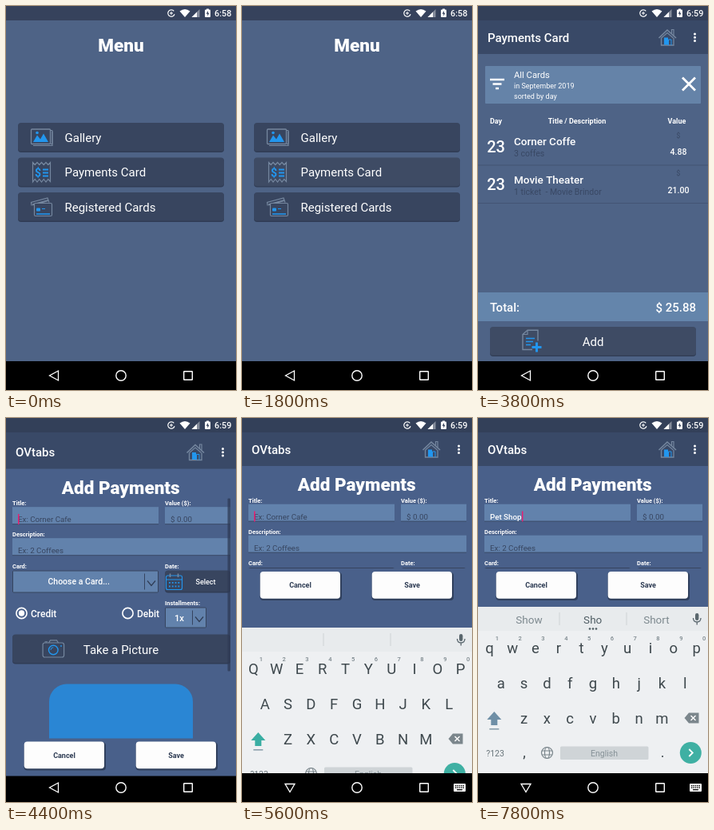
Recreate the animation shown at these times as an HTML page with a canvas. Size 288 by 480 pixels, loop 8000 ms.

```html
<!DOCTYPE html>
<html lang="en">
<head>
<meta charset="utf-8">
<title>Payments app</title>
<style>
html, body { margin: 0; width: 100%; height: 100%; overflow: hidden; background: #000; }
canvas { display: block; width: 288px; height: 480px; }
</style>
</head>
<body>
<canvas id="stage"></canvas>
<script>
const W = 288, H = 480, LOOP = 8000, STEP = 200;
const canvas = document.getElementById('stage');
const ctx = canvas.getContext('2d');
const dpr = window.devicePixelRatio || 1;
canvas.width = W * dpr;
canvas.height = H * dpr;

const BLUE = '#2296ee', STEEL = '#75879f', DARK = '#38455f', FIELD = '#6282ac',
      HINT = '#37455f', WHITE = '#fff', KEY = '#3e484d', SOFT = '#7b868c';

const clamp = v => Math.max(0, Math.min(1, v));
const easeOut = (p, k) => 1 - Math.pow(1 - clamp(p), k);

function rect(x, y, w, h, fill) {
  ctx.fillStyle = fill;
  ctx.fillRect(x, y, w, h);
}

function box(x, y, w, h, r, fill, stroke, lw = 1) {
  ctx.beginPath();
  ctx.roundRect(x, y, w, h, r);
  if (fill) { ctx.fillStyle = fill; ctx.fill(); }
  if (stroke) { ctx.strokeStyle = stroke; ctx.lineWidth = lw; ctx.stroke(); }
}

function disc(x, y, r, fill, stroke, lw = 1) {
  box(x - r, y - r, 2 * r, 2 * r, r, fill, stroke, lw);
}

function line(d, color, lw = 1) {
  ctx.strokeStyle = color;
  ctx.lineWidth = lw;
  ctx.stroke(new Path2D(d));
}

function shape(d, color) {
  ctx.fillStyle = color;
  ctx.fill(new Path2D(d));
}

function text(s, x, y, size, weight = 400, color = WHITE, align = 'left') {
  ctx.font = `${weight} ${size}px Roboto, sans-serif`;
  ctx.fillStyle = color;
  ctx.textAlign = align;
  ctx.fillText(s, x, y);
}

function at(x, y, fn) {
  ctx.save();
  ctx.translate(x, y);
  fn();
  ctx.restore();
}

function clipped(x, y, w, h, fn) {
  ctx.save();
  ctx.beginPath();
  ctx.rect(x, y, w, h);
  ctx.clip();
  fn();
  ctx.restore();
}

function slab(x, y, w, h, pressed) {
  box(x, y + 1, w, h, 4, '#303c55');
  box(x, y, w, h - 0.5, 4, DARK);
  if (pressed) box(x, y, w, h, 4, 'rgba(255,255,255,.03)');
}

// ---- icons, drawn from their own top left corner ----
function galleryIcon() {
  line('M3 21H27V3', STEEL, 1.2);
  line('M25 19H27V2H25', STEEL, 1);
  box(0.5, 0.5, 24, 18.5, 1, null, STEEL, 1.3);
  shape('M3 16.500L8 8L12 13L16 6L22 16.500Z', BLUE);
  disc(8, 5, 1.8, BLUE);
}

function receiptIcon() {
  let d = 'M0.5 1';
  for (let i = 1; i <= 8; i++) d += `L${0.5 + i * 2.75} ${i % 2 ? 4 : 1}`;
  d += 'V25';
  for (let i = 7; i >= 0; i--) d += `L${0.5 + i * 2.75} ${i % 2 ? 22 : 25.5}`;
  line(d + 'Z', STEEL, 1.2);
  text('$', 3, 18.5, 14, 700, BLUE);
  line('M13 10H20M13 14H20M13 18H20', BLUE, 2);
}

function cardsIcon() {
  line('M1 10L0.5 6L21 0.500L23 6', STEEL, 1.2);
  line('M2 9L22 3.500', STEEL, 2);
  box(4.5, 7, 22, 16, 1.5, DARK, STEEL, 1.2);
  box(7, 13, 5, 4, 1, BLUE);
  line('M7 20.500H24', BLUE, 1.6);
  line('M14 14H18', BLUE, 1);
}

function docIcon() {
  line('M13 25H1V6L7 0.800H20V14', STEEL, 1.4);
  line('M1 6H7V1', STEEL, 1.2);
  line('M5 11H16M5 15H14M5 19H11', BLUE, 1.6);
  line('M18.500 16V28M12.500 22H24.500', BLUE, 3);
}

function homeIcon() {
  line('M1 12L11.500 2L22.500 12', STEEL, 1.6);
  line('M4 12L11.500 5.500L19 12', STEEL, 1.1);
  line('M17 6.500V1.500H19.500V9', STEEL, 1.2);
  line('M4 12V21H19.500V12', STEEL, 1.3);
  box(7.5, 11.5, 5, 9, 0, BLUE);
  line('M13 21V14H16.500V21', BLUE, 1);
}

function calendarIcon() {
  box(0.5, 3.5, 20, 17.5, 2, null, BLUE, 1.1);
  line('M1 8.500H20', BLUE, 1);
  line('M5.500 1V5.500M15.500 1V5.500', STEEL, 1.6);
  for (let i = 0; i < 8; i++)
    rect(4 + (i % 4) * 3.8, 11.5 + (i >> 2) * 4.5, 1.8, 1.8, BLUE);
}

function cameraIcon() {
  box(0.6, 4, 26.5, 18, 2.5, null, STEEL, 1.2);
  line('M8 4L10 0.800H18L20 4', STEEL, 1.2);
  line('M3 2.800H6.500', STEEL, 1.3);
  disc(13.8, 13, 5.8, null, BLUE, 1.4);
  line('M10.500 13Q10.500 9.800 13.800 9.800', BLUE, 1);
  disc(23.5, 8, 0.9, BLUE);
}

// ---- system bars ----
function statusBar(t, color) {
  rect(0, 0, W, 18, color);
  ctx.beginPath();
  ctx.arc(207, 9, 4.2, 0.3, 5.6);
  ctx.strokeStyle = WHITE;
  ctx.lineWidth = 1.2;
  ctx.stroke();
  line('M205 9H209M207 7V11', WHITE, 1);
  shape('M217.500 6.500Q224 1.500 230.500 6.500L224 14Z', WHITE);
  shape('M242.500 4V14H232.500Z', 'rgba(255,255,255,.4)');
  shape('M239 7.500V14H232.500Z', WHITE);
  box(249, 4.5, 7, 9.5, 1, WHITE);
  rect(251, 3.5, 3, 1.5, WHITE);
  shape('M253 6L250.700 9.800H252.300V12.500L254.500 8.700H253Z', color);
  text(t < 2400 ? '6:58' : '6:59', 282.3, 13.2, 10.8, 500, WHITE, 'right');
}

function navIcons(keys) {
  line(keys ? 'M54 457.500H66L60 467.500Z' : 'M65.500 456V468L54.500 462Z', WHITE, 1.3);
  disc(144, 462, 6.2, null, WHITE, 1.4);
  box(222.7, 456.7, 10.6, 10.6, 0.5, null, WHITE, 1.4);
  if (!keys) return;
  box(265, 457, 15, 10, 1, WHITE);
  for (let i = 0; i < 10; i++)
    rect(267 + (i % 5) * 2.4, 459 + (i > 4 ? 2.4 : 0), 1.4, 1.4, '#000');
  rect(269, 464, 7, 1.3, '#000');
}

function appBar(title) {
  rect(0, 0, W, 60, '#394967');
  text(title, 12, 44.5, 15, 500);
  at(225.5, 28, homeIcon);
  for (let i = -1; i < 2; i++) disc(271.5, 39.2 + i * 4.2, 1.5, WHITE);
}

// ---- screens ----
function menu(t) {
  rect(0, 18, W, 426, '#4e6386');
  text('Menu', 144, 57, 22.5, 900, WHITE, 'center');
  ['Gallery', 'Payments Card', 'Registered Cards'].forEach((s, i) => {
    const y = 146 + i * 43.5;
    slab(15, y, 258, 36, i === 1 && t >= 1800);
    text(s, 73.5, y + 23.5, 15);
  });
  at(31, 153.5, galleryIcon);
  at(33, 194.5, receiptIcon);
  at(31, 239.5, cardsIcon);
}

function payment(y, title, note, value) {
  text('23', 22.5, y + 20, 20, 500, WHITE, 'center');
  text(title, 45, y + 11.5, 13.5, 500);
  text(note, 45, y + 25.5, 10.5, 400, '#394864');
  text('$', 251, y + 2, 8.5, 400, '#394864', 'center');
  text(value, 251, y + 23.5, 10.5, 500, WHITE, 'center');
  rect(0, y + 36, W, 1, '#435574');
}

function list(t) {
  rect(0, 18, W, 426, '#4e6386');
  appBar('Payments Card');
  box(9, 75, 270, 47, 1, '#6583a8');
  line('M15 92H33M18.500 97.500H29.500M22 103H26', WHITE, 2.4);
  text('All Cards', 45, 90, 11.25);
  text('in September 2019', 45, 103, 9);
  text('sorted by day', 45, 115.5, 9);
  line('M256 89.500L272 105.500M272 89.500L256 105.500', WHITE, 2.8);
  text('Day', 22.5, 147, 9, 700, WHITE, 'center');
  text('Title / Description', 124, 147, 9, 700, WHITE, 'center');
  text('Value', 249, 147, 9, 700, WHITE, 'center');
  payment(162.5, 'Corner Coffe', '3 coffes', '4.88');
  payment(210, 'Movie Theater', '1 ticket  - Movie Brindor', '21.00');
  rect(0, 358, W, 36, '#6485ab');
  text('Total:', 15, 381.5, 15, 500);
  text('$ 25.88', 273, 381.5, 15, 500, WHITE, 'right');
  slab(15, 401, 258, 36, t >= 3800);
  at(55, 404.5, docIcon);
  text('Add', 144, 424.5, 15, 400, WHITE, 'center');
}

function field(label, x, y, w) {
  text(label, x, y - 2, 7.5, 700);
  rect(x, y, w, 21, FIELD);
  rect(x, y + 21, w, 1, '#3d4d6b');
}

function picker(x, y, w, h, split) {
  box(x + 0.5, y + 0.5, w - 1, h - 1, 1, FIELD, '#36445f');
  rect(split, y + 4, 1, h - 8, '#36445f');
  const cx = (split + x + w) / 2, cy = y + h / 2 + 1;
  line(`M${cx - 5} ${cy - 2}L${cx} ${cy + 4}L${cx + 5} ${cy - 2}`, '#2f3c55', 1.2);
}

function radio(x, label, lx, on) {
  disc(x, 240.5, 6.6, null, WHITE, 1.6);
  if (on) disc(x, 240.5, 3.7, WHITE);
  text(label, lx, 245, 12, 500);
}

function typed(t) {
  const full = 'Pet Shop';
  if (t < 6200) return '';
  return t >= 7800 ? full : full.slice(0, Math.min(7, 1 + Math.floor((t - 6200) / 200)));
}

function titleField(t) {
  const s = typed(t);
  field('Title:', 8, 107.7, 183);
  if (s) text(s, 15, 126.5, 9.75, 500);
  else text('Ex: Corner Cafe', 15, 126.5, 9.75, 400, HINT);
  const blink = t < 4800 || (t >= 5300 && t < 5800) || t >= 6200;
  if (blink) rect(15 + (s ? ctx.measureText(s).width + 0.5 : 0), 116.5, 1.5, 13, '#e91e72');
}

function formBody(t) {
  text('Add Payments', 143.7, 91, 22.5, 900, WHITE, 'center');
  titleField(t);
  field('Value ($):', 199, 107.7, 82);
  text('$ 0.00', 206, 126.5, 9.75, 400, HINT);
  field('Description:', 8, 146.7, 273);
  text('Ex: 2 Coffees', 15, 165.5, 9.75, 400, HINT);
  text('Card:', 8, 184, 7.5, 700);
  text('Date:', 199, 184, 7.5, 700);
  picker(8, 187, 183, 28, 173);
  text('Choose a Card...', 91.2, 204.5, 10.5, 500, WHITE, 'center');
  slab(199, 187, 82, 27);
  at(200, 190, calendarIcon);
  text('Select', 250, 204.5, 9, 500, WHITE, 'center');
  radio(19.5, 'Credit', 31, true);
  radio(152.5, 'Debit', 164, false);
  text('Installments:', 199, 230.5, 7.5, 700);
  picker(199, 233, 52, 26, 233);
  text('1x', 217, 250, 11.25, 500, WHITE, 'center');
  slab(8, 267, 273, 36);
  at(45.5, 273.5, cameraIcon);
  text('Take a Picture', 144, 291, 15, 400, WHITE, 'center');
  box(54, 329, 180, 180, 22, '#2a86d4');
}

function whiteButton(s, x, y) {
  box(x - 0.5, y + 1, 102.5, 35, 4, '#30405d');
  box(x - 0.3, y, 100.3, 33.7, 4, '#fdfdfd');
  text(s, x + 50, y + 20.3, 9, 700, '#2c3a52', 'center');
}

function form(t, keys) {
  const end = keys ? 188 : 397, y = keys ? 192 : 401;
  rect(0, 18, W, 426, '#49608a');
  clipped(0, 60, W, end - 60, () => formBody(t));
  if (!keys) box(277.5, 97, 3.5, 216, 1, 'rgba(45,58,84,.75)');
  whiteButton('Cancel', 23, y);
  whiteButton('Save', 163, y);
  appBar('OVtabs');
}

function hints(s) {
  return {
    'Pe': ['Per', 'Pe', 'People'],
    'Pet': ['Pets', 'Pet', 'Peter'],
    'Pet Sh': ['She', 'Sh', 'Should'],
    'Pet Sho': ['Show', 'Sho', 'Short'],
    'Pet Shop': ['Show', 'Sho', 'Short']
  }[s];
}

function keyRow(letters, x, y, caps, digits) {
  [...letters].forEach((c, i) => {
    const cx = x + i * 28.8;
    text(caps ? c.toUpperCase() : c, cx, y, 18.5, 400, KEY, 'center');
    if (digits) text((i + 1) % 10, cx + 9.5, y - 16.5, 7.5, 500, SOFT, 'center');
  });
}

function keyboard(t) {
  const s = typed(t), caps = s === '' || s.endsWith(' ');
  rect(0, 236, W, 208, '#eef0f2');
  rect(0, 236, W, 30, '#e8ebed');
  rect(101.5, 243, 1, 16, '#cdd3d6');
  rect(185.5, 243, 1, 16, '#cdd3d6');
  const words = hints(s);
  if (words) {
    words.forEach((w, i) =>
      text(w, 64 + i * 79.7, 256.5, 13.5, 400, i === 1 ? '#4f5d64' : '#7d898f', 'center'));
    for (let i = -1; i < 2; i++) disc(144 + i * 4, 263.5, 1.3, '#4f5d64');
  }
  box(272, 244, 4.4, 9, 2.2, '#59666d');
  line('M269.500 250Q269.500 255 274.200 255T279 250M274.200 255V258.500', '#59666d', 1.3);

  keyRow('qwertyuiop', 14.4, 294, caps, true);
  keyRow('asdfghjkl', 28.8, 337.5, caps);
  keyRow('zxcvbnm', 57.6, 381.5, caps);
  shape('M20.300 367L29.300 377H24.300V384H16.300V377H11.300Z', caps ? '#3aaea3' : '#6f8fa6');
  rect(14.3, 388, 12, 1.6, '#8ba0ad');
  shape('M258.500 375L264 368.500H276.500V381.500H264Z', SOFT);
  line('M266.500 372L272.500 378M272.500 372L266.500 378', WHITE, 1.4);

  text('?123', 21.5, 422.5, 10.5, 400, '#69757b', 'center');
  text(',', 58, 424, 18, 400, KEY, 'center');
  disc(86.5, 418.5, 7, null, SOFT, 1.2);
  ctx.beginPath();
  ctx.ellipse(86.5, 418.5, 3, 7, 0, 0, 7);
  ctx.stroke();
  line('M80 416H93M80 421H93', SOFT, 1.1);
  box(103, 410.5, 110.5, 16.5, 1.5, '#cfd4d7');
  text('English', 158, 422.5, 10.5, 400, '#879298', 'center');
  text('.', 231, 424, 18, 400, KEY, 'center');
  disc(266.3, 418.5, 13.5, '#3fb0a3');
  line('M264.300 414L268.800 418.500L264.300 423', WHITE, 1.8);
}

// A new screen fades in while it rises into place.
function enter(t, begin, time, fn) {
  ctx.globalAlpha = clamp((t - begin) / 200);
  at(0, 38 * (1 - easeOut((t - begin) / time, 2.6)), fn);
  ctx.globalAlpha = 1;
}

function draw(t) {
  const keys = t >= 5500;
  ctx.setTransform(dpr, 0, 0, dpr, 0, 0);
  rect(0, 0, W, H, '#000');

  if (t < 2200) menu(t);
  if (t >= 1900 && t < 4300) enter(t, 1900, 300, () => list(t));
  if (t >= 4100) enter(t, 4100, 500, () => form(t, keys));
  if (keys) clipped(0, 0, W, 444, () =>
    at(0, 208 * (1 - easeOut((t - 5400) / 400, 3)), () => keyboard(t)));

  statusBar(t, t < 2000 ? '#36425c' : '#334059');
  navIcons(keys);
}

const start = performance.now();

// The screen advances in even steps.
function tick() {
  const t = (performance.now() - start) % LOOP;
  draw(Math.floor(t / STEP) * STEP);
  requestAnimationFrame(tick);
}
tick();
</script>
</body>
</html>
```
